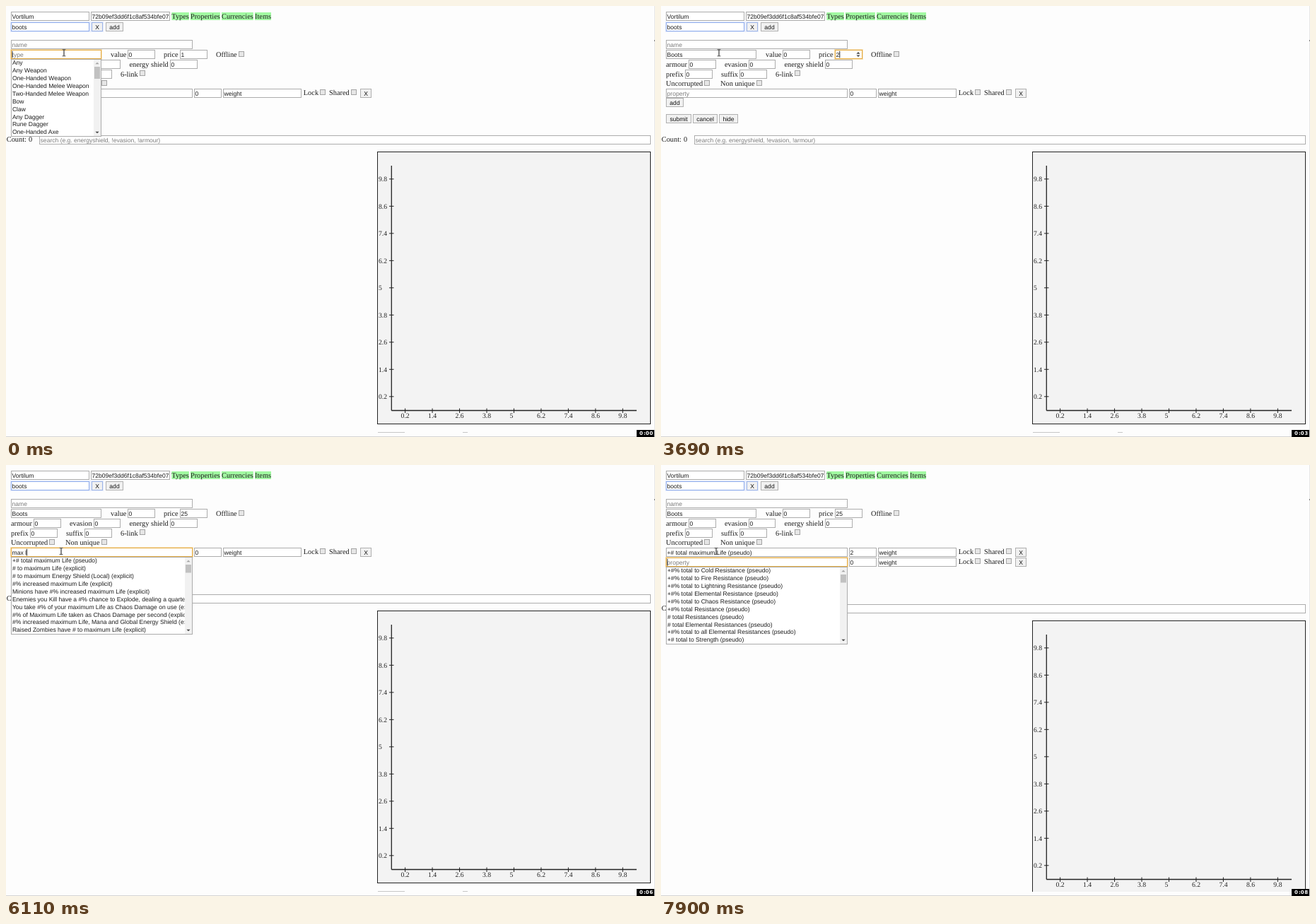
These frames come from a looping animation (918x610 px, 8 s). An HTML page with a canvas:

```html
<!DOCTYPE html>
<html lang="en">
<head>
<meta charset="utf-8">
<title>Item search form</title>
<style>
  html, body { margin: 0; width: 100%; height: 100%; overflow: hidden; background: #fdfdfd; }
  canvas { display: block; }
</style>
</head>
<body>
<canvas id="stage" width="918" height="610"></canvas>
<script>
const ctx = document.getElementById('stage').getContext('2d');
const LOOP = 8000;
const SANS = '8.55px "Liberation Sans", Arial, sans-serif';
const SERIF = '10.35px "Liberation Serif", "Times New Roman", serif';
const AXIS = '9.7px "Liberation Serif", "Times New Roman", serif';
const CLOCK = 'bold 7px "DejaVu Sans", sans-serif';
const INK = '#1c1c1c', HINT = '#7b7b7b', EDGE = '#acacac', FOCUS = '#e5ab40';
const ROW = 10.88, LINE = 14;

const TYPES = [
  'Any', 'Any Weapon', 'One-Handed Weapon', 'One-Handed Melee Weapon',
  'Two-Handed Melee Weapon', 'Bow', 'Claw', 'Any Dagger', 'Rune Dagger',
  'One-Handed Axe', 'Body Armour', 'Boots', 'Belt', 'Base Jewel',
  'Beast', 'Blueprint', 'Battle Staff', 'Base Dagger'
];
const PROPS = [
  '+#% total to Cold Resistance (pseudo)',
  '+#% total to Fire Resistance (pseudo)',
  '+#% total to Lightning Resistance (pseudo)',
  '+#% total Elemental Resistance (pseudo)',
  '+#% total to Chaos Resistance (pseudo)',
  '+#% total Resistance (pseudo)',
  '# total Resistances (pseudo)',
  '# total Elemental Resistances (pseudo)',
  '+#% total to all Elemental Resistances (pseudo)',
  '+# total to Strength (pseudo)',
  '+# total maximum Life (pseudo)',
  '+# total maximum Mana (pseudo)',
  '+# total maximum Energy Shield (pseudo)',
  '#% total increased maximum Energy Shield (pseudo)',
  '#% increased Movement Speed (pseudo)',
  '# Mana Regenerated per Second (pseudo)',
  '# to maximum Life (explicit)',
  '# to maximum Energy Shield (Local) (explicit)',
  '#% increased maximum Life (explicit)',
  'Minions have #% increased maximum Life (explicit)',
  'Enemies you Kill have a #% chance to Explode, dealing a quarter of their maximum Life (explicit)',
  'You take #% of your maximum Life as Chaos Damage on use (explicit)',
  '#% of Maximum Life taken as Chaos Damage per second (explicit)',
  '#% increased maximum Life, Mana and Global Energy Shield (explicit)',
  'Raised Zombies have # to maximum Life (explicit)',
  '# to Spectre maximum Life (explicit)',
  'Totems gain #% increased maximum Life (explicit)'
];

// time, focused field, its text, options
const STEPS = [
  [0, 'type', ''], [270, 'type', 'b'], [1180, 'type', 'bo'], [1350, 'type', 'boo'],
  [1710, 'type', 'Boots'],
  [2200, 'value', '0', { selected: true }], [2310, 'price', '1', { selected: true }],
  [3690, 'price', '2'], [3870, 'price', '25'],
  [4850, 'prop', ''], [5710, 'prop', 'm'], [5870, 'prop', 'ma'], [5960, 'prop', 'max'],
  [6030, 'prop', 'max '], [6110, 'prop', 'max l'], [6210, 'prop', 'max li'],
  [6280, 'prop', 'max lif'],
  [6520, 'prop', '+# total maximum Life (pseudo)', { query: 'max lif' }],
  [6600, 'num', '0', { selected: true }], [7140, 'num', ''], [7300, 'num', '2'],
  [7630, 'prop2', '']
];
const TICKS = [970, 1970, 2940, 3960, 4880, 5960, 6930, 7900];
const ADD_ROW = 6520;

function stateAt(t) {
  const vals = { type: '', value: '0', price: '1', prop: '', num: '0', prop2: '' };
  let step;
  for (const s of STEPS) if (s[0] <= t) { step = s; vals[s[1]] = s[2]; }
  const opts = step[3] || {};
  return {
    vals, focus: step[1], selected: opts.selected,
    query: opts.query || step[2],
    caret: !opts.selected && (t - step[0]) % 990 < 495
  };
}

function rect(x, y, w, h, fill) {
  ctx.fillStyle = fill;
  ctx.fillRect(x, y, w, h);
}

function outline(x0, y0, x1, y1, color) {
  ctx.strokeStyle = color;
  ctx.lineWidth = 1;
  ctx.strokeRect(x0 + 0.5, y0 + 0.5, x1 - x0 - 1, y1 - y0 - 1);
}

function frame(x0, y0, x1, y1, fill, stroke) {
  rect(x0, y0, x1 - x0, y1 - y0, fill);
  outline(x0, y0, x1, y1, stroke);
}

function text(s, x, y, font = SANS, color = INK, align = 'left') {
  ctx.font = font;
  ctx.fillStyle = color;
  ctx.textAlign = align;
  ctx.fillText(s, x, y);
}

const label = (s, x, y) => text(s, x, y, SERIF);

function segment(x0, y0, x1, y1, color, width = 1) {
  ctx.strokeStyle = color;
  ctx.lineWidth = width;
  ctx.beginPath();
  ctx.moveTo(x0, y0);
  ctx.lineTo(x1, y1);
  ctx.stroke();
}

function arrow(x, y, dir, color, r = 2.6) {
  ctx.fillStyle = color;
  ctx.beginPath();
  ctx.moveTo(x - r, y - dir * r / 2);
  ctx.lineTo(x + r, y - dir * r / 2);
  ctx.lineTo(x, y + dir * r / 2);
  ctx.fill();
}

function input(x0, x1, y, value, hint = '', edge = EDGE) {
  frame(x0, y, x1, y + 13, '#fff', edge);
  ctx.save();
  ctx.beginPath();
  ctx.rect(x0 + 1, y, x1 - x0 - 3, 13);
  ctx.clip();
  text(value || hint, x0 + 1.6, y + 9.7, SANS, value ? INK : HINT);
  ctx.restore();
}

// Input that can hold the focus, with caret, selection and spinner
function field(st, id, x0, x1, y, hint, spinner) {
  const value = st.vals[id];
  const focused = st.focus === id;
  input(x0, x1, y, value, hint, focused ? FOCUS : EDGE);
  if (!focused) return;
  outline(x0 - 1, y - 1, x1 + 1, y + 14, 'rgba(229, 171, 64, 0.35)');
  ctx.font = SANS;
  const end = x0 + 1.6 + ctx.measureText(value).width;
  if (st.selected) {
    rect(x0 + 1.6, y + 1.5, end - x0 - 1.6, 10, '#3390ff');
    text(value, x0 + 1.6, y + 9.7, SANS, '#fff');
  } else if (st.caret) {
    rect(end, y + 1.8, 0.9, 9.6, '#111');
  }
  if (spinner) {
    arrow(x1 - 6, y + 4.4, -1, '#444');
    arrow(x1 - 6, y + 8.8, 1, '#444');
  }
}

function button(s, x0, x1, y, edge = '#b0b0b0') {
  frame(x0, y, x1, y + 13, '#f1f1f1', edge);
  text(s, (x0 + x1) / 2, y + 9.6, SANS, '#111', 'center');
}

function check(x, y) {
  frame(x, y, x + 8, y + 8, '#e6e6e6', '#a4a4a4');
}

function dropdown(items, query, x1, y, thumb) {
  const words = query.trim().split(' ').filter(Boolean).map(w => new RegExp('\\b' + w, 'i'));
  const hits = items.filter(s => words.every(w => w.test(s)));
  const x0 = 7, bottom = y + 110, bar = x1 - 11;
  frame(x0, y, x1, bottom, '#fff', EDGE);
  ctx.save();
  ctx.beginPath();
  ctx.rect(x0 + 1, y + 1, bar - x0 - 1.5, 108);
  ctx.clip();
  hits.slice(0, 10).forEach((s, i) => text(s, 8.9, y + 8.4 + i * ROW));
  ctx.restore();
  rect(bar, y + 1, 10, 108, '#f1f1f1');
  const full = hits.length > 10;
  if (full) rect(bar + 1, y + 11, 8, thumb, '#c1c1c1');
  arrow(bar + 5, y + 6, -1, '#a3a3a3');
  arrow(bar + 5, y + 104, 1, full ? '#444' : '#a3a3a3');
}

function chart(top) {
  frame(525, top, 912, top + 386, '#f3f3f3', '#222');
  const base = top + 366.5;
  segment(545.3, top + 20, 545.3, base, '#222', 1.3);
  segment(545.3, base, 892, base, '#222', 1.3);
  for (let i = 0; i < 9; i++) {
    const s = String(+(0.2 + 1.2 * i).toFixed(1));
    const x = 564.6 + 38.47 * i, y = top + 346.8 - 38.49 * i;
    segment(x, base - 3, x, base + 3.5, '#222');
    segment(542, y, 548.5, y, '#222');
    text(s, x - 6, top + 377.4, AXIS, '#222');
    text(s, 527, y + 3.5, AXIS, '#222');
  }
}

function header() {
  input(7, 118, 8, 'Vortilum');
  input(120, 232, 8, '72b09ef3dd6f1c8af534bfe07f');
  const links = [['Types', 234.3], ['Properties', 260.9], ['Currencies', 305], ['Items', 352]];
  for (const [s, x] of links) {
    ctx.font = SERIF;
    rect(x, 9, ctx.measureText(s).width, 11, '#a2f9a2');
    label(s, x, 17.6);
  }
  rect(6, 22, 132, 15, '#e6ecfb');
  input(7, 118, 23, 'boots', '', '#8facec');
  button('X', 121, 137, 23, '#9db4e6');
  button('add', 141, 166, 23);
}

function propRow(st, id, numId, y) {
  field(st, id, 7, 264, y, 'property');
  if (numId) field(st, numId, 266, 305, y, 'value');
  else input(266, 305, y, '0');
  input(307, 418, y, 'weight');
  label('Lock', 420.8, y + 9.4);
  check(444, y + 1);
  label('Shared', 457, y + 9.4);
  check(488, y + 1);
  button('X', 501, 517, y);
}

function form(st) {
  input(7, 264, 48, '', 'name');
  field(st, 'type', 7, 135, 62, 'type');
  label('value', 148, 72);
  field(st, 'value', 172, 211, 62, '', true);
  label('price', 223, 72);
  field(st, 'price', 246, 285, 62, '', true);
  label('Offline', 297, 72);
  check(329, 64);

  label('armour', 7, 86);
  input(39, 78, 76, '0');
  label('evasion', 90, 86);
  input(124, 162, 76, '0');
  label('energy shield', 174.5, 86);
  input(232, 271, 76, '0');

  label('prefix', 7, 99.8);
  input(34, 73, 90, '0');
  label('suffix', 85, 99.8);
  input(111, 150, 90, '0');
  label('6-link', 162, 99.8);
  check(189, 91);

  label('Uncorrupted', 7, 113.4);
  check(61, 105);
  label('Non unique', 84, 113.4);
  check(135, 105);
}

function page(st, shift) {
  ctx.save();
  ctx.beginPath();
  ctx.rect(0, 0, 916, 604);
  ctx.clip();
  header();
  form(st);
  propRow(st, 'prop', 'num', 117);
  if (shift) propRow(st, 'prop2', null, 117 + LINE);
  button('add', 7, 32, 130 + shift);
  button('submit', 7, 43, 153 + shift);
  button('cancel', 45, 80, 153 + shift);
  button('hide', 82, 109, 153 + shift);
  label('Count:', 0.8, 192 + shift);
  label('0', 32, 192 + shift);
  input(47, 912, 183 + shift, '', 'search (e.g. energyshield, !evasion, !armour)');
  chart(206 + shift);
  input(526, 564, 603 + shift, '', '', '#c6c6c6');
  frame(646, 603 + shift, 653, 611 + shift, '#eee', '#c6c6c6');
  const propThumb = st.query.length > 5 ? 16 : 11.5;
  if (st.focus === 'type') dropdown(TYPES, st.query, 135, 75, 17);
  if (st.focus === 'prop') dropdown(PROPS, st.query, 264, 130, propThumb);
  if (st.focus === 'prop2') dropdown(PROPS, st.query, 264, 130 + LINE, propThumb);
  ctx.restore();
}

function pointer(t) {
  const n = Math.max(0, Math.min(9, Math.floor((t - 4320) / 46.25) + 1));
  const p = n / 9, e = p * p * (3 - 2 * p);
  const x = 82 - 4 * e, y = 66.3 + 55.7 * e;
  segment(x, y - 4.5, x, y + 4.5, '#222', 1.1);
  for (const dy of [-4.5, 4.5]) segment(x - 2.4, y + dy, x + 2.4, y + dy, '#444', 0.9);
}

function clock(t) {
  const sec = TICKS.filter(k => k <= t).length;
  rect(892, 600, 25, 10, '#000');
  [['0', 896], [':', 901.9], ['0', 904.8], [sec, 910.2]]
    .forEach(([s, x]) => text(s, x, 607.2, CLOCK, '#fff'));
}

function draw(t) {
  const shift = t >= ADD_ROW ? LINE : 0;
  rect(0, 0, 918, 610, '#fdfdfd');
  page(stateAt(t), shift);
  rect(917, 0, 1, 610, '#e6e6e6');
  rect(917, 48, 1, 2, '#777');
  rect(0, 609, 918, 1, '#d4d4d4');
  pointer(t);
  clock(t);
}

ctx.textRendering = 'geometricPrecision';
const start = performance.now();
function tick() {
  draw((performance.now() - start) % LOOP);
  requestAnimationFrame(tick);
}
tick();
</script>
</body>
</html>
```
